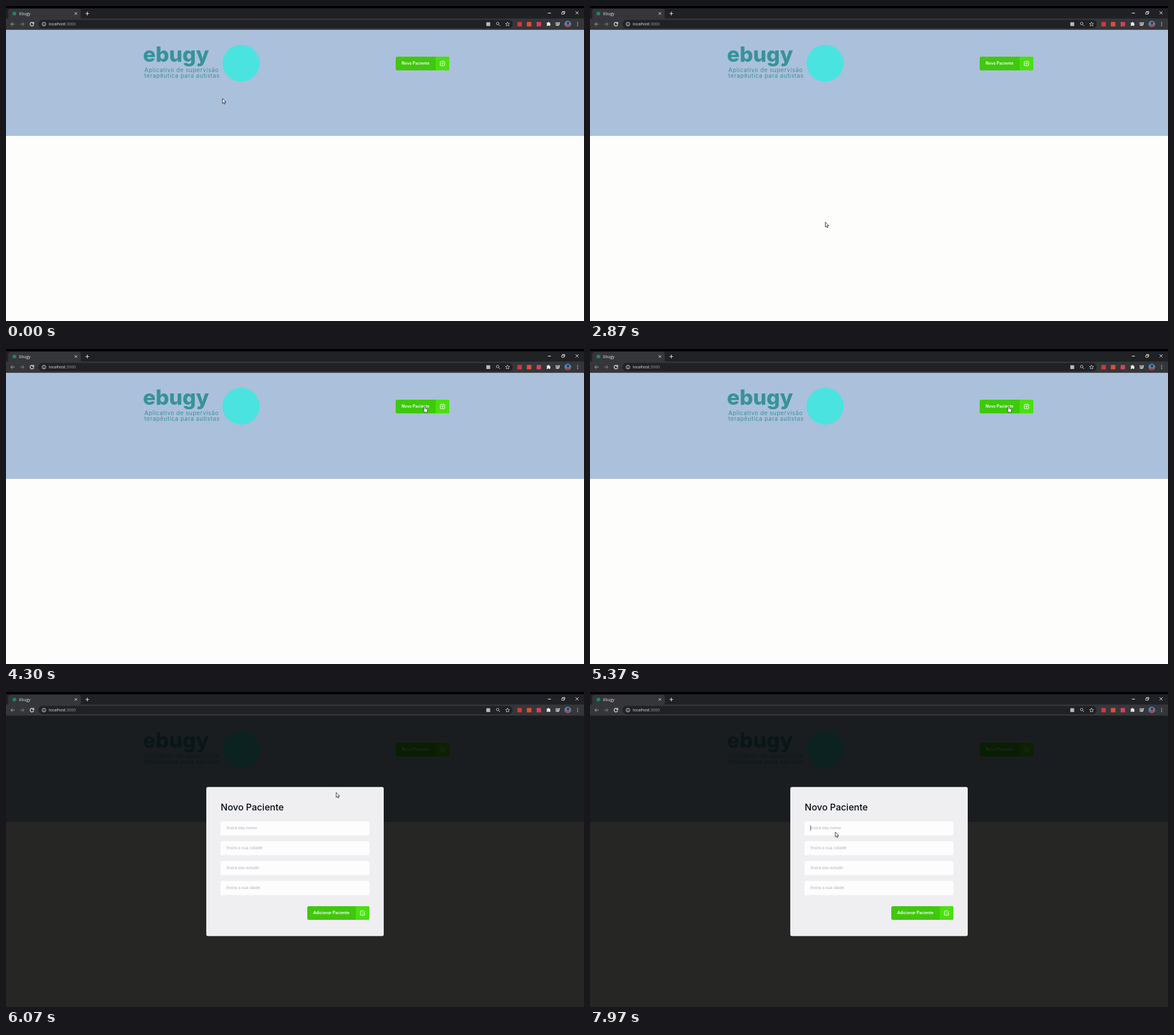
Write an HTML page with a canvas that moves like this. It is 1013 px wide and 553 px high and loops after 8 s.

```html
<!DOCTYPE html>
<html lang="pt-BR">
<head>
<meta charset="utf-8">
<title>Ebugy</title>
<style>
html, body { margin: 0; width: 100%; height: 100%; overflow: hidden; background: #fdfdfc; }
canvas { display: block; width: 100vw; height: 100vh; }
</style>
</head>
<body>
<canvas id="stage"></canvas>
<script>
const W = 1013, H = 553, LOOP = 8000;
const OPEN_AT = 5400, FOCUS_AT = 7900;
const UI = 'Inter, sans-serif', CHROME = '"Open Sans", sans-serif';
const canvas = document.getElementById('stage');
const ctx = canvas.getContext('2d');
const dpr = window.devicePixelRatio || 1;
canvas.width = Math.round(W * dpr);
canvas.height = Math.round(H * dpr);

// Pointer stops: time, x, y; the pointer rests between equal positions.
const STOPS = [
  [0, 379, 162], [600, 379, 162], [760, 397, 186], [1530, 397, 186],
  [1530, 412, 379], [3480, 412, 379], [3630, 497, 331], [3730, 642, 240],
  [3860, 712, 140], [4020, 734, 101], [5370, 734, 101], [5400, 733, 101],
  [5780, 733, 101], [6350, 430, 248], [FOCUS_AT, 430, 248],
  [FOCUS_AT, 429.5, 245.5], [LOOP, 429.5, 245.5]
];

function rect(x, y, w, h, color, r = 0) {
  ctx.fillStyle = color;
  ctx.beginPath();
  ctx.roundRect(x, y, w, h, r);
  ctx.fill();
}

function disc(x, y, r, color) {
  ctx.fillStyle = color;
  ctx.beginPath();
  ctx.arc(x, y, r, 0, Math.PI * 2);
  ctx.fill();
}

function text(str, x, y, font, color, spacing = 0) {
  ctx.font = font;
  ctx.fillStyle = color;
  ctx.letterSpacing = spacing + 'px';
  ctx.fillText(str, x, y);
}

function line(d, color, width = 1, x = 0, y = 0) {
  ctx.save();
  ctx.translate(x, y);
  ctx.strokeStyle = color;
  ctx.lineWidth = width;
  ctx.stroke(new Path2D(d));
  ctx.restore();
}

function shape(d, x, y, fill, stroke, width) {
  const path = new Path2D(d);
  ctx.save();
  ctx.translate(x, y);
  ctx.fillStyle = fill;
  ctx.fill(path);
  if (stroke) {
    ctx.strokeStyle = stroke;
    ctx.lineWidth = width;
    ctx.stroke(path);
  }
  ctx.restore();
}

function drawTabs() {
  rect(0, 0, W, 41.5, '#202124');
  rect(0, 0, W, 4, '#000');
  rect(4, 5, 127, 20, '#35363a', [4, 4, 0, 0]);
  rect(0, 22, W, 19.5, '#35363a');
  disc(14.7, 13.3, 3.3, '#17876c');
  text('Ebugy', 23, 15.8, '7px ' + CHROME, '#e4e6e9');
  line('M-2-2L2 2M2-2L-2 2', '#e8eaed', 1, 122.5, 13.2);
  line('M-3.2 0H3.2M0-3.2V3.2', '#e8eaed', 1, 142.5, 13.2);
  line('M-2.7 0H2.7', '#fff', 1, 952.3, 12.5);
  line('M-2.5-1H1.5V2.5H-2.5ZM-1-1V-2.5H2.8V1H1.5', '#fff', .8, 976.5, 12);
  line('M-2.6-2.6L2.6 2.6M2.6-2.6L-2.6 2.6', '#fff', .9, 1000.8, 12);
}

function drawToolbar() {
  line('M3.5 0H-3.2M0-3.3L-3.3 0L0 3.3', '#a4a7ab', 1, 11.7, 31.8);
  line('M-3.5 0H3.2M0-3.3L3.3 0L0 3.3', '#85878b', 1, 28.3, 31.8);
  line('M2.4-2.2A3.2 3.2 0 1 0 3.2 .8M3.2-3.6V-.8H.4', '#f1f3f4', 1.2, 45.4, 31.8);
  rect(57, 24.5, 831, 14.5, '#202124', 7.2);

  ctx.strokeStyle = '#e8eaed';
  ctx.lineWidth = .9;
  ctx.beginPath();
  ctx.arc(66.5, 31.8, 3.3, 0, 7);
  ctx.stroke();
  line('M0-1.9V-.9M0-.2V2', '#e8eaed', .9, 66.5, 31.8);
  text('localhost', 75, 34.3, '7px ' + CHROME, '#e8eaed');
  const w = ctx.measureText('localhost').width;
  text(':3000', 75 + w, 34.3, '7px ' + CHROME, '#9aa0a6');

  rect(841.8, 28.5, 6.8, 6.8, '#b6b9bd', .6);
  line('M1.4-.8A2.2 2.2 0 1 1-3-.8A2.2 2.2 0 1 1 1.4-.8M.8.8L3.4 3.4', '#c4c7ca', 1, 862.5, 31.6);
  line('M0-3.6L1-1.2L3.6-1L1.6.7L2.3 3.3L0 1.9L-2.3 3.3L-1.6.7L-3.6-1L-1-1.2Z', '#d5d7da', .8, 879, 31.8);

  rect(896.2, 28, 7.8, 7.8, '#d0393b', 1);
  rect(912.8, 28, 8, 7.8, '#d8503a', 1);
  rect(930, 28, 7.8, 7.8, '#d3405c', 1);
  shape('M-3.2-2H-1.2A1.2 1.2 0 0 1 1.2-2H2.8V0A1.2 1.2 0 0 1 2.8 2.2V3.8H.9A1.1 1.1 0 0 0-1.3 3.8H-3.2V1.7A1.1 1.1 0 0 0-3.2-.4Z',
    950.8, 31.3, '#eceef0');
  line('M-3.8-2.6H1.5M-3.8-.4H1.5M-3.8 1.8H-.8M2.4 2V-2.6H4', '#e8eaed', 1.1, 967, 31.8);
  disc(2 + 965.3, 33.8, 1.3, '#e8eaed');

  ctx.save();
  ctx.beginPath();
  ctx.arc(984.6, 31.5, 5.8, 0, 7);
  ctx.clip();
  rect(978, 25, 13, 13, '#4887b5');
  disc(985, 29.8, 2, '#3a2b32');
  shape('M-4 6Q-3.5.5.5.3Q4 .5 4.3 6Z', 984.5, 31.5, '#a44849');
  ctx.restore();
  for (const dy of [-2.7, 0, 2.7]) disc(1001.8, 31.8 + dy, .8, '#e8eaed');
}

function button(x, y, w, label, icon) {
  const split = x + w - 24;
  rect(x, y, w, 24, '#3fc80c', 3);
  rect(split, y, 24, 24, '#4ae00f', [0, 3, 3, 0]);
  text(label, x + 10.3, y + 14.2, '600 7px ' + UI, '#fff');
  line(icon, '#fff', 1, split + 12, y + 12);
}

function drawPage() {
  rect(0, 41.5, W, H, '#fdfdfc');
  rect(0, 41.5, W, 186.5, '#abc0da');
  text('ebugy', 240, 98, '800 37px ' + UI, '#37929c');
  text('Aplicativo de supervisão', 242.6, 116, '10px ' + UI, '#37929c', .6);
  text('terapêutica para autistas', 242.6, 126, '10px ' + UI, '#37929c', .6);
  disc(412, 100.5, 32.5, '#4ae3e0');
  button(683, 89, 94, 'Novo Paciente',
    'M-3-3.8H3Q3.8-3.8 3.8-3V3Q3.8 3.8 3 3.8H-3Q-3.8 3.8-3.8 3V-3Q-3.8-3.8-3-3.8ZM-2 0H2M0-2V2');
}

function drawModal(t) {
  rect(0, 41, W, H - 41, 'rgba(0,0,0,.85)');
  rect(351, 166.7, 311, 261.8, '#efeff2', 3);
  text('Novo Paciente', 376.3, 208, '500 16px ' + UI, '#050b12');
  ['Insira seu nome', 'Insira a sua cidade', 'Insira seu estado', 'Insira a sua idade'].forEach((label, i) => {
    const y = 227 + i * 34.9;
    rect(376, y, 261, 24.7, '#fdfdfd', 3.5);
    text(label, 386.7, y + 14.3, '7.1px ' + UI, '#b0b0b9');
  });
  if (t >= FOCUS_AT) rect(386.3, 234.5, .8, 9, '#333');
  button(528, 376, 109, 'Adicionar Paciente',
    'M3.8-.2V3Q3.8 3.8 3 3.8H-3Q-3.8 3.8-3.8 3V-3Q-3.8-3.8-3-3.8H1.8M-1.7-.4L0 1.3L4.2-3.2');
}

function pointerAt(t) {
  let i = 0;
  while (i < STOPS.length - 2 && t >= STOPS[i + 1][0]) i++;
  const [t0, x0, y0] = STOPS[i], [t1, x1, y1] = STOPS[i + 1];
  const k = (t - t0) / (t1 - t0);
  return [x0 + (x1 - x0) * k, y0 + (y1 - y0) * k];
}

function drawPointer(t) {
  const [x, y] = pointerAt(t);
  const open = t >= OPEN_AT;
  const overButton = x > 683 && x < 777 && y > 89 && y < 113;
  const overField = open && x > 376 && x < 637 && y > 227 && y < 252;
  if (overButton && t < 5780) {
    shape('M-1.1 0Q0-1.2 1.1 0V3.5L3.8 4.1Q5 4.5 4.8 6L4.2 8.8V10.2H-.8V9L-3 6Q-3.1 4.8-1.9 5.2L-1.1 6Z',
      x, y, '#fff', '#15191c', .7);
  } else if (overField && t < FOCUS_AT) {
    line('M-2-4H-.7L0-3.5L.7-4H2M0-3.5V3.5M-2 4H-.7L0 3.5L.7 4H2', '#222', .9, x + .3, y + .5);
  } else {
    shape('M.4.4V9L2.4 7.1L3.7 10.2L5.2 9.5L3.9 6.6H6.5Z', x, y, '#fff', '#111', .8);
  }
}

function frame(now) {
  const t = (now - start) % LOOP;
  ctx.setTransform(canvas.width / W, 0, 0, canvas.height / H, 0, 0);
  drawPage();
  if (t >= OPEN_AT) drawModal(t);
  drawTabs();
  drawToolbar();
  drawPointer(t);
  requestAnimationFrame(now => frame(Math.max(now, start)));
}

const start = performance.now();
frame(start);
</script>
</body>
</html>
```
